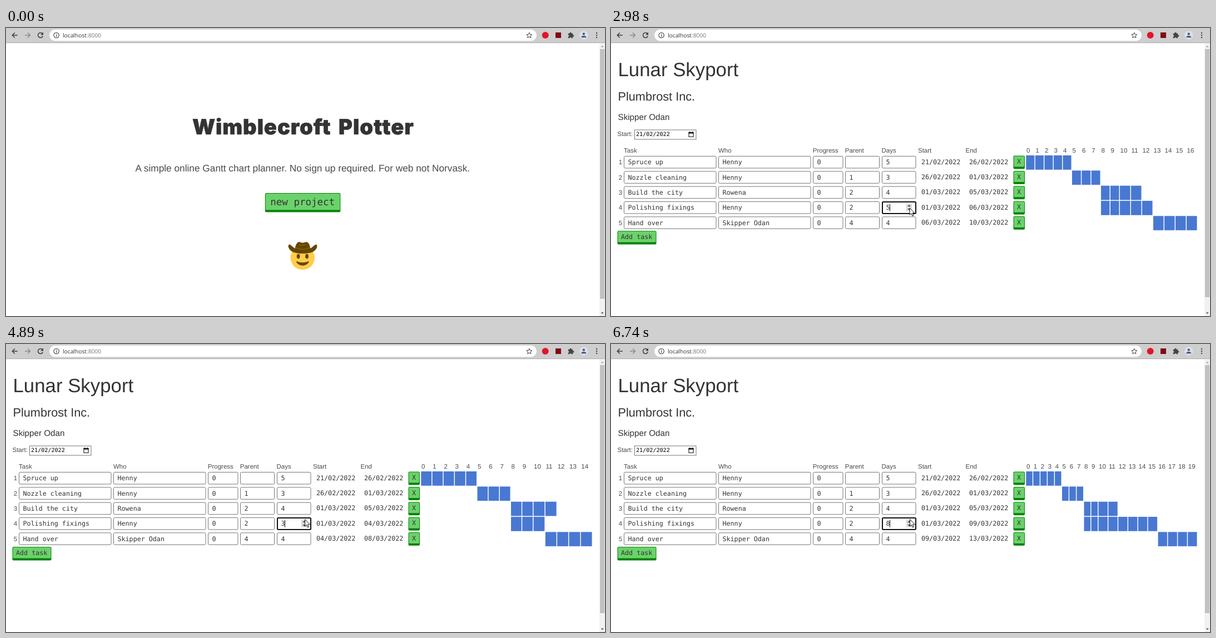
An HTML page that plays this animation: 1077x520 px, repeating every 6770 ms.

```html
<!DOCTYPE html>
<html lang="en">
<head>
<meta charset="utf-8">
<title>Gantt planner</title>
<style>
  html, body { margin: 0; width: 100%; height: 100%; overflow: hidden; background: #fff; }
  svg { display: block; width: 100vw; height: 100vh; }
  text { font: 11.5px "Liberation Sans", Arial, sans-serif; fill: #4a4a4a; white-space: pre; text-rendering: geometricPrecision; }
  .mono { font: 11.7px "DejaVu Sans Mono", monospace; fill: #333; }
  .head { fill: #333; }
  .title { font: 900 38px Inter, "Open Sans", sans-serif; letter-spacing: 1px; word-spacing: 5px; fill: #333; stroke: #333; stroke-width: .6; }
  .field { fill: #fff; stroke: #767676; }
  .focus { fill: #fff; stroke: #101010; stroke-width: 2; }
  .bar { fill: #4878d2; }
  .url { font: 10.25px "Open Sans", "Noto Sans", sans-serif; fill: #333; }
  .line { fill: none; stroke: #3c3c3c; stroke-width: 1.5; }
</style>
</head>
<body>
<svg viewBox="0 0 1077 520">
  <rect width="1077" height="520" fill="#fff"/>

  <g id="home">
    <text class="title" x="534.3" y="191.5" text-anchor="middle">Wimblecroft Plotter</text>
    <text x="533.3" y="259" text-anchor="middle" style="font-size:17.27px">A simple online Gantt chart planner. No sign up required. For web not Norvask.</text>
    <g id="newBtn"></g>
    <circle cx="533.3" cy="414.8" r="21.7" fill="#ffcc4d"/>
    <g fill="#664500">
      <ellipse cx="525.6" cy="412.3" rx="2.9" ry="4.3"/>
      <ellipse cx="541" cy="412.3" rx="2.9" ry="4.3"/>
      <path d="M522.6 421.2Q533.3 425.6 544 421.2Q545.2 421.4 544.6 422.6Q541 429 533.3 429T522 422.6Q521.4 421.4 522.6 421.2Z"/>
      <path d="M509 391C512 390 516 397 522 399C530 402 537 402 545 399C551 397 555 390 558 391C562 394 557 403 549 405.3C539 408 528 408 518 405.3C510 403 505 394 509 391Z"/>
      <path d="M519.5 399C521 390 524 386 528 386.4C531 387 532 387.8 533.5 387.8S536 387 539 386.4C543 386 546 390 547.5 399C540 403 527 403 519.5 399Z"/>
    </g>
    <path d="M521 396.6Q533.4 402.6 546 396.6M526.5 390.5Q533.4 394 540.5 390.5" fill="none" stroke="#825d0e" stroke-width="1.8"/>
  </g>

  <g id="app">
    <text class="head" x="12.5" y="87" style="font-size:34.8px">Lunar Skyport</text>
    <text class="head" x="12.5" y="131" style="font-size:21.7px">Plumbrost Inc.</text>
    <text class="head" x="12.5" y="165.7" style="font-size:15.2px">Skipper Odan</text>
    <text x="11.5" y="195.3">Start:</text>
    <rect class="field" x="42.5" y="184" width="110.5" height="17"/>
    <text class="mono" x="45" y="195.3" style="font-size:10.1px;fill:#000">21/02/2022</text>
    <path d="M140 188.5h8v8h-8z" fill="none" stroke="#111" stroke-width="1.1"/>
    <path d="M139.5 188h9v2.4h-9zM141.2 186.8h1.2v2h-1.2zM145.8 186.8h1.2v2h-1.2z" fill="#111"/>
    <g id="addBtn"></g>
    <g id="table"></g>
    <g id="spin">
      <rect id="hover" x="530.5" y="317.5" width="10.5" height="13.5" fill="#dedede"/>
      <path d="M533 322.3l3-3.2 3 3.2zM533 326l3 3.2 3-3.2z" fill="#505050"/>
    </g>
    <rect id="caret" y="318" width="1" height="13" fill="#111"/>
  </g>

  <rect width="1077" height="27" fill="#cecece"/>
  <rect y="26" width="1077" height="1.2" fill="#aeaeae"/>
  <rect x="78" y="2.7" width="876" height="20.6" rx="10.3" fill="#fff"/>
  <path class="line" d="M20.8 13H11.5M15.8 8.5L11.3 13l4.5 4.5"/>
  <path class="line" d="M34 13h9.3M39 8.5l4.5 4.5-4.5 4.5" style="stroke:#8a8a8a"/>
  <path class="line" d="M65.6 10.2A4.5 4.5 0 1 0 66.2 14.6"/>
  <path d="M67 7.6v4.8h-4.8z" fill="#3c3c3c"/>
  <circle class="line" cx="90.6" cy="13" r="4.7" style="stroke-width:1.1"/>
  <path d="M90 10.2h1.2v1.2H90zM90 12.4h1.2v3.4H90z" fill="#3c3c3c"/>
  <text class="url" x="102" y="16.7">localhost<tspan fill="#777">:8000</tspan></text>
  <path class="line" d="M940.8 8.2l1.4 3.3 3.6.3-2.7 2.4.8 3.5-3.1-1.9-3.1 1.9.8-3.5-2.7-2.4 3.6-.3z" style="stroke-width:1"/>
  <circle cx="969.7" cy="13" r="6" fill="#e2132b"/>
  <rect x="988" y="8" width="10" height="10" fill="#800a14"/>
  <path d="M1010.8 9.8h2.7a1.6 1.6 0 1 1 3 0h2.7v2.7a1.6 1.6 0 1 1 0 3v2.7h-2.7a1.5 1.5 0 0 0-3 0h-2.7v-2.7a1.5 1.5 0 0 0 0-3z" fill="#444"/>
  <circle cx="1038.8" cy="13" r="7.7" fill="#dde0ea"/>
  <circle cx="1038.8" cy="10.6" r="2.2" fill="#48587e"/>
  <path d="M1034.3 17.2q0-3.3 4.5-3.3t4.5 3.3z" fill="#48587e"/>
  <g fill="#444"><circle cx="1062" cy="9" r="1.2"/><circle cx="1062" cy="13" r="1.2"/><circle cx="1062" cy="17" r="1.2"/></g>

  <rect x="1067" y="27.2" width="10" height="493" fill="#f1f1f1"/>
  <rect id="thumb" x="1068" y="38" width="8.3" fill="#c1c1c1"/>
  <path d="M1069.6 34.6l2.6-2.8 2.6 2.8z" fill="#a3a3a3"/>
  <path d="M1069.6 513.4l2.6 2.8 2.6-2.8z" fill="#505050"/>

  <g id="pointer">
    <path id="arrow" d="M0 0V12.4L2.9 9.8 4.9 14.4 7 13.5 5 9.1H8.9Z" fill="#fff" stroke="#111" stroke-width="1"/>
    <g id="beam" fill="none">
      <path d="M-2.6-5.3H2.6M0-5.3V5.3M-2.6 5.3H2.6" stroke="#222" stroke-width="2.6"/>
      <path d="M-2-5.3H2M0-5.3V5.3M-2 5.3H2" stroke="#ddd" stroke-width=".7"/>
    </g>
  </g>
</svg>
<script>
const LOOP = 6770, APP_AT = 1850;
const $ = id => document.getElementById(id);
const show = (id, on) => $(id).style.display = on ? '' : 'none';
const text = (x, y, s, cls = '') => `<text class="${cls}" x="${x}" y="${y}">${s}</text>`;
const rect = (x, y, w, h, cls, r = 0) =>
  `<rect class="${cls}" x="${x}" y="${y}" width="${w}" height="${h}" rx="${r}"/>`;

function button(x, y, w, h, label, tx, ty, size = 11.7) {
  return `<rect x="${x}" y="${y}" width="${w}" height="${h}" rx="2" fill="#058205"/>
    <rect x="${x + 1}" y="${y + 1}" width="${w - 2}" height="${h - 5}" rx="1" fill="#6bd26b"/>
    <text class="mono" x="${tx}" y="${ty}" style="font-size:${size}px">${label}</text>`;
}

// moment of each click and the value it leaves in the Days field
const clicks = [[0, 5], [3210, 4], [3370, 3], [3540, 2], [3750, 1], [4720, 2], [4840, 3],
  [5010, 4], [5150, 5], [5280, 6], [5410, 7], [5570, 8]];
const caretOff = [[2320, 2820], [4300, 4720], [6120, 6740]];
const route = [[2020, 848, 1], [2160, 800, 60], [2400, 640, 215], [2560, 560, 295],
  [2690, 538, 321], [2850, 536, 320], [2980, 537, 325], [4070, 537, 325],
  [4160, 534, 323], [4300, 534, 323], [4420, 537.3, 320], [4540, 537.5, 316.7]];

// chart x at columns 0, 5, 8, 10 and at the right edge
const marks = {
  2: [753, 861, 925.5, 969, 1055],
  3: [746.3, 847.5, 908, 948.5, 1055],
  4: [746.3, 837, 892, 929, 1055],
  5: [746.3, 829, 881, 915, 1055],
  6: [746.3, 821, 869, 900, 1055],
  7: [746.3, 815.5, 859, 887, 1055],
  8: [746.3, 811, 850.5, 876.5, 1055]
};
const tight = { who: 193.5, progress: 363.5, parent: 421.5, days: 487.5, start: 552, end: 638, del: 723.5 };
const roomy = { who: 195, progress: 366.3, parent: 424.5, days: 491, start: 556.5, end: 642.7, del: 729.3 };

function columnX(days, i) {
  const at = [0, 5, 8, 10, 12 + Math.max(days, 2)], xs = marks[Math.max(days, 2)];
  let k = 0;
  while (k < 3 && i >= at[k + 1]) k++;
  return xs[k] + (xs[k + 1] - xs[k]) * (i - at[k]) / (at[k + 1] - at[k]);
}

const date = n => new Date(Date.UTC(2022, 1, 21 + n)).toISOString()
  .slice(0, 10).split('-').reverse().join('/');

function table(days) {
  const c = days < 3 ? roomy : tight;
  const tasks = [
    ['Spruce up', 'Henny', '', 0, 5],
    ['Nozzle cleaning', 'Henny', 1, 5, 3],
    ['Build the city', 'Rowena', 2, 8, 4],
    ['Polishing fixings', 'Henny', 2, 8, days],
    ['Hand over', 'Skipper Odan', 4, 8 + days, 4]
  ];
  const heads = [['Task', 23], ['Who', c.who - .5], ['Progress', c.progress - .7], ['Parent', c.parent - .7],
    ['Days', c.days - 1], ['Start', c.start], ['End', c.end - .5]];
  let out = heads.map(([s, x]) => text(x, 224.7, s)).join('');
  for (let i = 0; i < 12 + Math.max(days, 2); i++) out += text(columnX(days, i) + .6, 224.7, i);

  tasks.forEach(([name, who, parent, from, len], row) => {
    const y = 242.2 + 27.35 * row, base = y + 4.2;
    const field = (x, w, s) => rect(x, y - 10.7, w, 21.5, 'field', 2) + text(x + 7, base, s, 'mono');
    const ring = row === 3 ? rect(c.days + .5, 314, 60, 21, 'focus', 1.5) + text(c.days + 7, base, len, 'mono') : '';
    out += text(13.7, base, row + 1)
      + field(23.5, 165.5, name) + field(c.who, 165.5, who)
      + field(c.progress, 53.5, 0) + field(c.parent, 61, parent)
      + (ring || field(c.days, 60.5, len))
      + text(c.start + 6, base - .7, date(from), 'mono')
      + text(c.end + 6, base - .7, date(from + len), 'mono')
      + button(c.del, y - 11.6, 20.5, 24, 'X', c.del + 6.5, base - 1);
    for (let i = from; i < from + len; i++) {
      const x = columnX(days, i);
      out += rect(x, 230 + 27.35 * row, columnX(days, i + 1) - x - 1.46, 25.8, 'bar');
    }
  });
  return out;
}

function pointerAt(t) {
  let k = route.findIndex(p => p[0] > t);
  if (k < 0) return route[route.length - 1].slice(1);
  const [t0, x0, y0] = route[k - 1], [t1, x1, y1] = route[k];
  const f = (t - t0) / (t1 - t0);
  return [x0 + (x1 - x0) * f, y0 + (y1 - y0) * f];
}

$('newBtn').innerHTML = button(465.8, 298, 135.5, 34.5, 'new project', 475.3, 320, 17.5);
$('addBtn').innerHTML = button(11.5, 366.3, 70, 24.5, 'Add task', 18, 381.3);

let drawn = 0;
function render(t) {
  const inApp = t >= APP_AT, moving = t >= route[0][0];
  show('home', !inApp);
  show('app', inApp);
  show('pointer', moving);
  $('thumb').setAttribute('height', inApp ? 448 : 451);
  if (!inApp) return;

  const [since, days] = clicks.filter(c => c[0] <= t).pop();
  if (days !== drawn) $('table').innerHTML = table(drawn = days);
  const shift = days < 3 ? 3.5 : 0;
  $('spin').setAttribute('transform', `translate(${shift})`);
  $('caret').setAttribute('x', 501 + shift);
  show('caret', !caretOff.some(([a, b]) => t >= a && t < b));

  let hovering = false;
  if (moving) {
    const [x, y] = pointerAt(t);
    const inField = x > 486 && x < 552 && y > 313 && y < 335;
    const beam = y < 24 && y > 3 || inField && x < 535.5;
    hovering = inField && !beam;
    $('pointer').setAttribute('transform', `translate(${x} ${y})`);
    show('arrow', !beam);
    show('beam', beam);
  }
  show('hover', hovering);
  $('hover').setAttribute('fill', since && t - since < 50 ? '#c8c8c8' : '#dedede');
}

const begin = performance.now();
function tick() {
  render((performance.now() - begin) % LOOP);
  requestAnimationFrame(tick);
}
tick();
</script>
</body>
</html>
```
